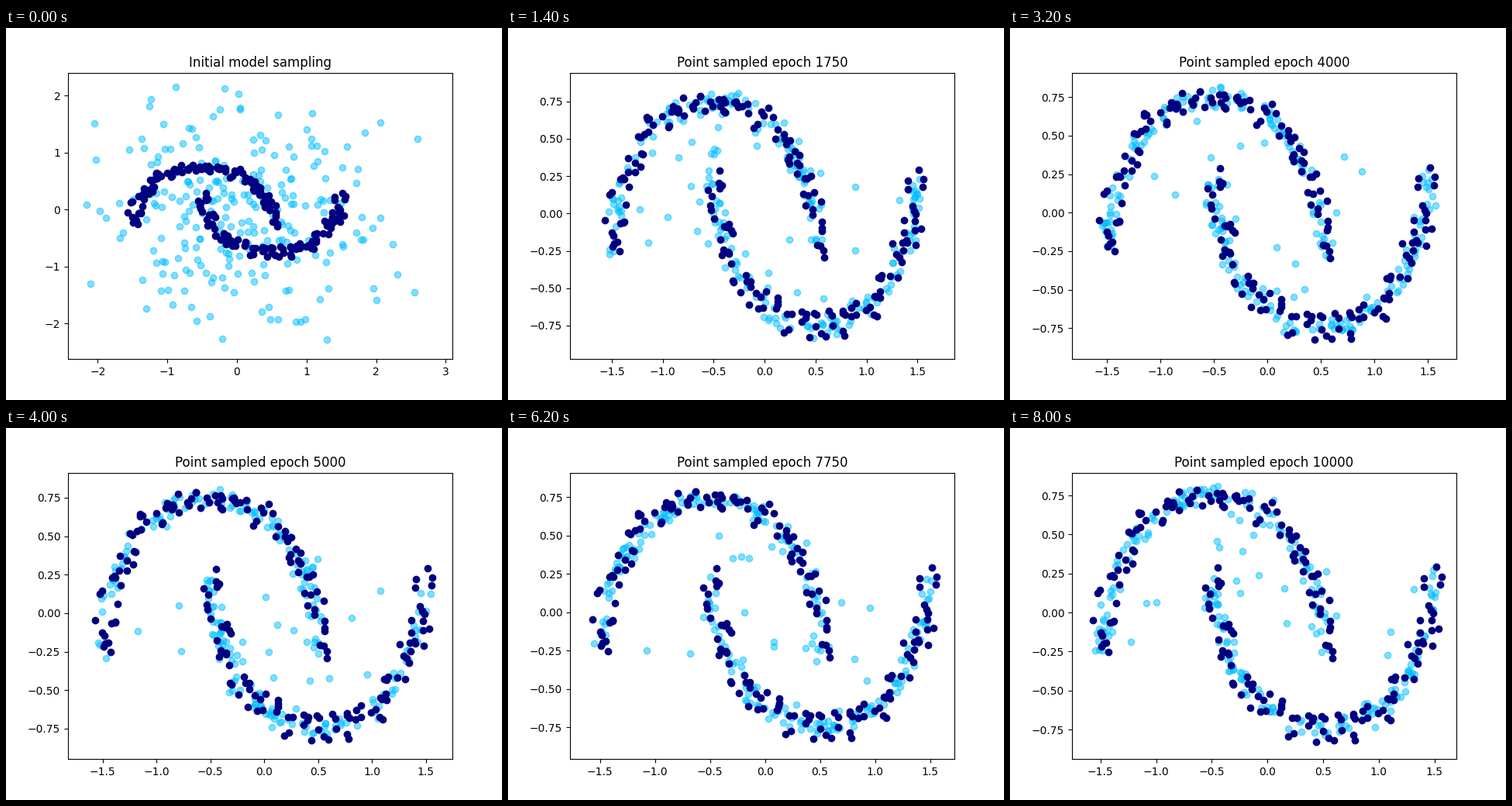
A matplotlib script for the animation above (8200 ms loop, 640 by 480 pixels).

```python
import numpy as np
import matplotlib.pyplot as plt
from matplotlib.animation import FuncAnimation

plt.rcParams["font.family"] = "DejaVu Sans"

FRAMES, STEP_MS, EPOCHS = 41, 200, 250
N_TARGET, N_MODEL = 100, 250        # per moon, per sampling
START_BOX = np.array([[-2.427, -2.622], [3.097, 2.405]])


def arch(t):
    return np.column_stack([np.cos(t) - .5, np.sin(t) - .25])


def bowl(t):
    return -arch(t)


def make_target():
    rng = np.random.default_rng(4)
    t = np.linspace(0, np.pi, N_TARGET)
    moons = np.vstack([arch(t), bowl(t)])
    return moons + rng.uniform(-.09, .09, moons.shape)


def view_box(step):
    """Lower-left and upper-right corner of the axes."""
    if step == 0:
        return START_BOX
    settle = np.exp((4 - step) / 4)
    shrink = step / FRAMES
    low = np.array([-1.86 + .1 * shrink - .151 * settle,
                    -.945 - .086 * settle])
    high = np.array([1.83 - .15 * shrink + .108 * settle,
                     .91 + .086 * settle])
    # A little jitter, as in axes fitted anew to every sample.
    wobble = np.random.default_rng(step).uniform(-1, 1, (2, 2))
    return np.array([low, high]) + wobble * (1 - np.exp(-abs(step - 4))) * .015


def inside(points, box):
    """Keep the points that an autoscale margin of 5 % would leave in."""
    low, high = box
    pad = (high - low) * .0455
    return points[np.all((points > low + pad) & (points < high - pad), axis=1)]


def sample_model(step):
    rng = np.random.default_rng(100 + step)
    if step == 0:
        return rng.normal(0, 1, (N_MODEL, 2))
    noise = .036 + .3 * np.exp(-step / 1.9)
    stray = int(N_MODEL * (.1 + .3 * np.exp(-step / 4)))
    half = (N_MODEL - stray) // 2
    angles = rng.uniform(0, np.pi, (2, half))
    mix = rng.uniform(0, 1, (stray, 1))
    bridge = (mix * arch(rng.uniform(0, np.pi, stray))
              + (1 - mix) * bowl(rng.uniform(0, np.pi, stray)))
    points = np.vstack([arch(angles[0]), bowl(angles[1]), bridge])
    return points + rng.normal(0, noise, points.shape)


TARGET = make_target()
fig, ax = plt.subplots(figsize=(6.4, 4.8), dpi=100)


def draw(step):
    box = view_box(step)
    ax.clear()
    ax.scatter(*inside(sample_model(step), box).T, color="deepskyblue",
               alpha=.5)
    ax.scatter(*TARGET.T, color="navy")
    ax.set_xlim(box[:, 0])
    ax.set_ylim(box[:, 1])
    ax.set_title(f"Point sampled epoch {step * EPOCHS}" if step
                 else "Initial model sampling", pad=5.3)
    return ax.collections


anim = FuncAnimation(fig, draw, frames=FRAMES, interval=STEP_MS,
                     repeat=True, repeat_delay=0, blit=False)
plt.show()
```
